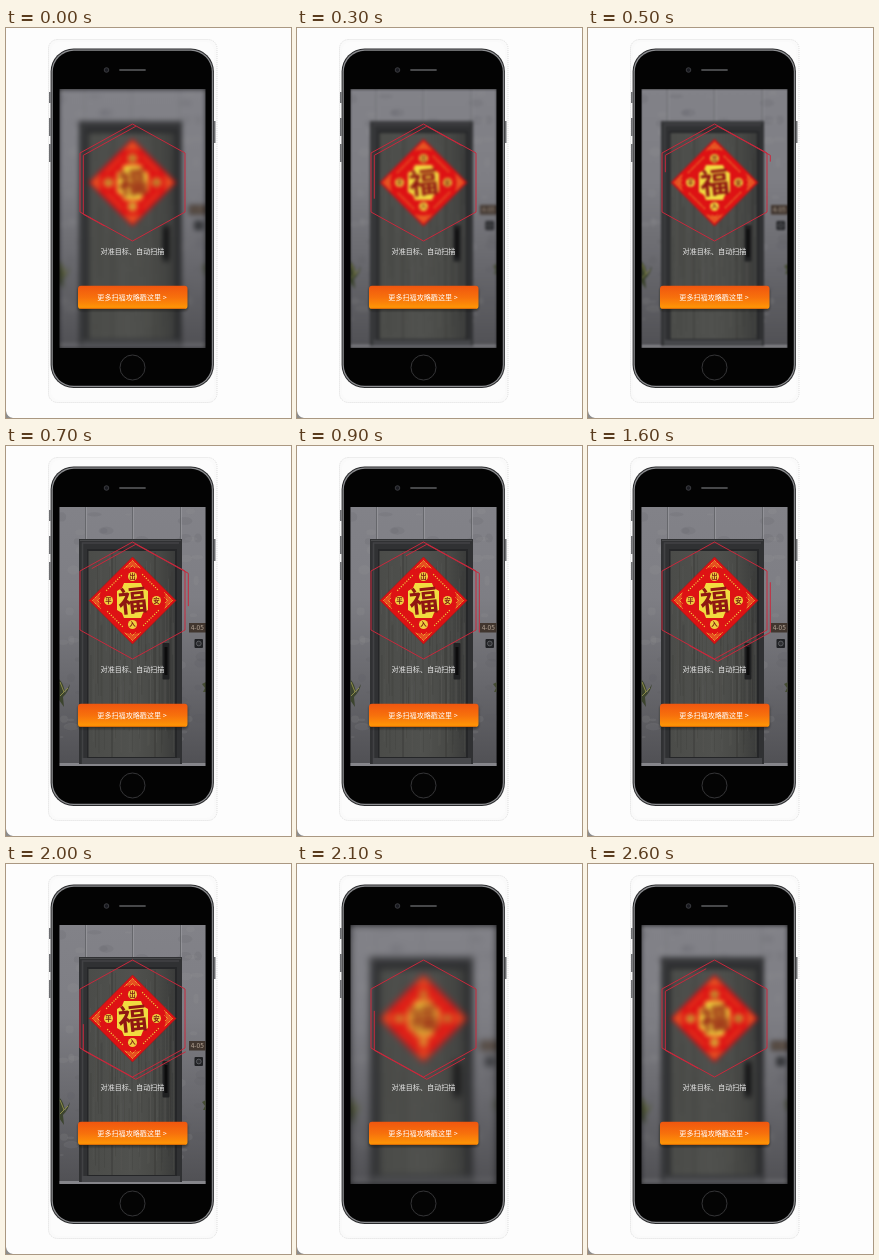
An HTML page that plays this animation: 285x390 px, repeating every 2.7 s.

```html
<!DOCTYPE html>
<html lang="zh">
<head>
<meta charset="utf-8">
<style>
html, body { margin: 0; width: 100%; height: 100%; overflow: hidden; background: #fdfdfd; }
svg { display: block; width: 285px; height: 390px; }
text { font-family: "Noto Sans CJK SC", "Noto Sans CJK", sans-serif; text-anchor: middle; }
</style>
</head>
<body>
<svg viewBox="0 0 285 390">
  <defs>
    <filter id="blur" filterUnits="userSpaceOnUse" x="40" y="48" width="174" height="286" color-interpolation-filters="sRGB">
      <feGaussianBlur id="soft" stdDeviation="2"/>
    </filter>
    <filter id="shade" x="-10%" y="-20%" width="120%" height="150%"><feGaussianBlur stdDeviation="1"/></filter>
    <clipPath id="screen"><rect x="53.5" y="61" width="146" height="259"/></clipPath>
    <linearGradient id="wall" x1="0" y1="0" x2="0" y2="1">
      <stop offset="0" stop-color="#828288"/><stop offset=".35" stop-color="#7e7e84"/>
      <stop offset=".65" stop-color="#6a6a6f"/><stop offset="1" stop-color="#505054"/>
    </linearGradient>
    <linearGradient id="panel" x1="0" y1="0" x2="1" y2="0">
      <stop offset="0" stop-color="#4b4c49"/><stop offset=".5" stop-color="#50514e"/>
      <stop offset=".8" stop-color="#484946"/><stop offset="1" stop-color="#3b3c3b"/>
    </linearGradient>
    <linearGradient id="orange" x1="0" y1="0" x2="0" y2="1">
      <stop offset="0" stop-color="#f0560f"/><stop offset=".5" stop-color="#f7700c"/><stop offset="1" stop-color="#ff9a05"/>
    </linearGradient>
  </defs>

  <rect width="285" height="390" fill="#fdfdfd"/>
  <path d="M0 383Q1 389 7 390H0Z" fill="#8d8d8d"/>

  <!-- case and phone -->
  <rect x="42.5" y="11.5" width="168.5" height="363" rx="9" fill="#fafafa" stroke="#dedede" stroke-dasharray="1 1"/>
  <rect x="45" y="14" width="163" height="358" rx="8" fill="#fcfcfc"/>
  <g fill="#6d6e71">
    <rect x="43" y="64" width="1.5" height="11"/><rect x="43" y="90" width="1.5" height="18"/>
    <rect x="43" y="116" width="1.5" height="18"/><rect x="208" y="93" width="1.5" height="22"/>
  </g>
  <rect x="44.6" y="20.6" width="163.3" height="339.4" rx="23" fill="#2a2b2d"/>
  <rect x="45.6" y="21.6" width="161.3" height="337.4" rx="22" fill="#8d8e91"/>
  <rect x="46.8" y="22.8" width="159" height="335" rx="21" fill="#030303"/>
  <circle cx="100.5" cy="42" r="2.3" fill="#191a20" stroke="#45464a" stroke-width=".8"/>
  <path d="M114 42H139" stroke="#47484a" stroke-width="1.8" stroke-linecap="round"/>
  <circle cx="126.5" cy="339.5" r="12.5" fill="#040404" stroke="#3c3c3e" stroke-width=".9"/>

  <g clip-path="url(#screen)">
    <rect x="53" y="61" width="147" height="259" fill="#18181a"/>
    <g id="scene">
      <rect x="53" y="61" width="147" height="259" fill="url(#wall)"/>
      <g id="stains"></g>
      <path d="M79.5 61V93M126.5 61V93M174.5 61V93" stroke="#606165" stroke-width=".8"/>
      <path d="M80.5 61V93M127.5 61V93M175.5 61V93" stroke="#a0a0a5" stroke-width=".6"/>
      <path d="M53 317H200V320H53Z" fill="#85858a"/>
      <path d="M73 93H176V318H73Z" fill="#303133"/>
      <path d="M74 94.5H175" stroke="#48494b" stroke-width="1"/>
      <path d="M76.5 318V97H173" fill="none" stroke="#414244" stroke-width="1.6"/>
      <path d="M81 103H171V312H81Z" fill="#252628"/>
      <path d="M82.5 105H169V311H82.5Z" fill="url(#panel)"/>
      <g id="grain"></g>
      <path d="M106 106V311M149 106V311" stroke="#383936" stroke-width=".8"/>
      <path d="M76 312H174V318H76Z" fill="#46474a"/>
      <rect x="156.5" y="197" width="7" height="36.5" rx="1" fill="#202122"/>
      <path d="M160 201V229" stroke="#0c0c0d" stroke-width="3"/>
      <rect x="183" y="177" width="17" height="9.5" fill="#41362f"/>
      <text x="191.3" y="184.4" font-size="6.5" fill="#b9a99a">4-05</text>
      <rect x="188.5" y="193" width="8.5" height="9" rx="1" fill="#1f2023"/>
      <circle cx="192.8" cy="197.5" r="2.4" fill="#2d2e31" stroke="#707176" stroke-width=".7"/>
      <path d="M53 233Q58 238 59 247L64 238Q63 245 57 251L58 261L53 254Z" fill="#3c442e"/>
      <path d="M54 236L58 246M54 250L62 242" stroke="#8a8a48" stroke-width="1"/>
      <path d="M200 236L196 238L199 242L197 246H200Z" fill="#464d34"/>

      <path d="M126.5 111L170 154.5L126.5 198L83 154.5Z" fill="#de1214" stroke="#a91415" stroke-width=".6"/>
      <g id="sign"></g>
      <path d="M118 137H135L137 142L142 145V164L137 167L135 172H118L116 167L111 164V145L116 142Z" fill="#f1dc40"/>
      <text transform="rotate(-6 126.5 154.5)" x="126.5" y="165.2" font-size="29" font-weight="900" fill="#8f1712">福</text>
    </g>

    <path id="hexA" fill="none" stroke="#c9283c" stroke-width="1"/>
    <path id="hexB" fill="none" stroke="#c9283c" stroke-width="1" pathLength="1" stroke-dasharray=".4 .6"/>
    <text x="126.5" y="225.7" font-size="7.1" fill="#ececec">对准目标、自动扫描</text>
    <rect x="72" y="259.5" width="109.5" height="23" rx="3" fill="#1c1411" opacity=".6" filter="url(#shade)"/>
    <rect x="72" y="257.7" width="109.5" height="23.3" rx="3" fill="url(#orange)"/>
    <path d="M74 280.4H179.5" stroke="#d76a08" stroke-width="1"/>
    <text x="126" y="272.3" font-size="7.1" font-weight="500" fill="#fff">更多扫福攻略戳这里 &gt;</text>
  </g>
</svg>
<script>
const LOOP = 2700, STEP = 100;
const BLUR_START = 2100, BLUR_TIME = 1600, BLUR_MAX = 3.9;
const CX = 126.5, CY = 154.5, DASH = .4;
const $ = id => document.getElementById(id);

function add(parent, tag, attrs, label) {
  const el = document.createElementNS("http://www.w3.org/2000/svg", tag);
  for (const key in attrs) el.setAttribute(key, attrs[key]);
  if (label) el.textContent = label;
  parent.appendChild(el);
}

let seed = 17;
function rnd() {
  seed = (seed * 16807) % 2147483647;
  return seed / 2147483647;
}

function buildTexture() {
  for (let i = 0; i < 90; i++) {
    const y = 108 + rnd() * 165;
    add($("grain"), "path", {
      d: `M${(84 + rnd() * 84).toFixed(1)} ${y.toFixed(1)}v${(12 + rnd() * (296 - y)).toFixed(1)}`,
      stroke: rnd() < .5 ? "#363733" : "#62635e", "stroke-width": .5, opacity: .5
    });
  }
  for (let i = 0; i < 90; i++) {
    add($("stains"), "ellipse", {
      cx: 53 + rnd() * 147, cy: 63 + rnd() * 240, rx: 2 + rnd() * 6, ry: 1 + rnd() * 4,
      fill: rnd() < .5 ? "#97979d" : "#58585d", opacity: .15
    });
  }
}

function buildSign() {
  const sign = $("sign"), gold = "#f0cf3e";
  const words = ["出", "安", "入", "平"];
  words.forEach((word, i) => {
    const a = (i - 1) * Math.PI / 2, ux = Math.cos(a), uy = Math.sin(a);
    const x = CX + ux * 24, y = CY + uy * 24;
    add(sign, "circle", { cx: x, cy: y, r: 4.5, fill: gold });
    add(sign, "text", { x, y: y + 2.3, "font-size": 6.4, "font-weight": 700, fill: "#7d2014" }, word);
    const at = (r, s) => `${CX + ux * r - uy * s} ${CY + uy * r + ux * s}`;
    add(sign, "path", { d: `M${at(32, -8)}L${at(40, 0)}L${at(32, 8)}L${at(34, 0)}Z`, fill: "#f09a30", opacity: .45 });
    add(sign, "path", {
      d: `M${at(32, -8)}L${at(40, 0)}L${at(32, 8)}M${at(32, -3)}L${at(35, 0)}L${at(32, 3)}`,
      fill: "none", stroke: gold, "stroke-width": .9, "stroke-dasharray": "1.2 .9"
    });
    // dotted row beside each edge
    const p = k => `${CX + 36 * (ux * (1 - k) - uy * k)} ${CY + 36 * (uy * (1 - k) + ux * k)}`;
    add(sign, "path", { d: `M${p(.27)}L${p(.73)}`, stroke: gold, "stroke-width": 1.2, "stroke-dasharray": "1.2 1.4" });
  });
}

function hexagon(dx, dy) {
  const pts = [[0, -58.5], [52.5, -29.5], [52.5, 29.5], [0, 58.5], [-52.5, 29.5], [-52.5, -29.5]];
  return "M" + pts.map(([x, y]) => `${CX + x + dx} ${CY + y + dy}`).join("L") + "Z";
}

function draw(ms) {
  const t = Math.floor((ms % LOOP) / STEP) * STEP;
  const age = (t - BLUR_START + LOOP) % LOOP;
  const blur = BLUR_MAX * Math.max(0, 1 - age / BLUR_TIME);
  $("soft").setAttribute("stdDeviation", blur);
  if (blur > .3) $("scene").setAttribute("filter", "url(#blur)");
  else $("scene").removeAttribute("filter");
  // the second outline runs clockwise as one long dash
  $("hexB").setAttribute("stroke-dashoffset", DASH - t / LOOP);
}

buildTexture();
buildSign();
$("hexA").setAttribute("d", hexagon(0, 0));
$("hexB").setAttribute("d", hexagon(3.3, 2.3));
const start = performance.now();
function tick() {
  draw(performance.now() - start);
  requestAnimationFrame(tick);
}
tick();
</script>
</body>
</html>
```
